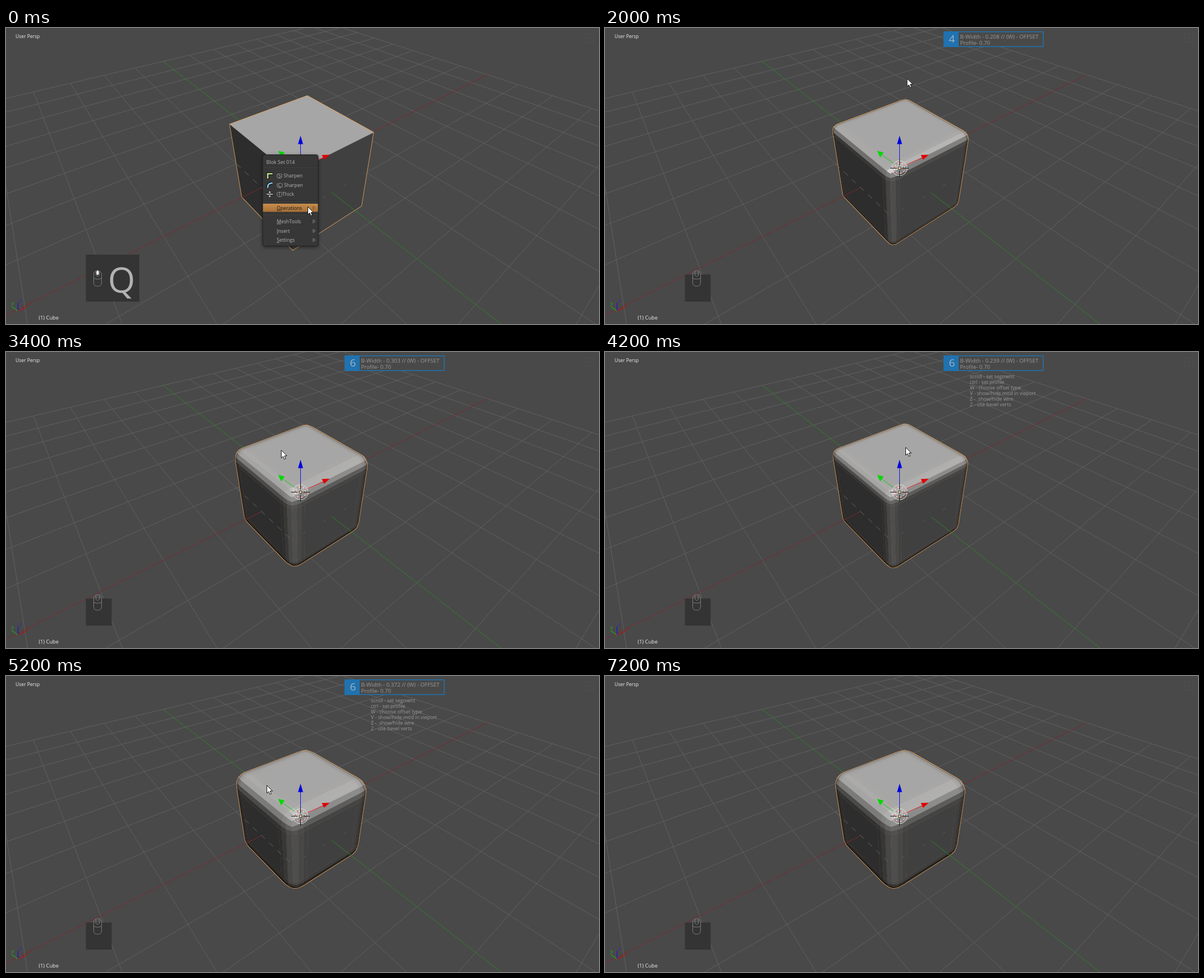
Write an HTML page with a canvas that moves like this. It is 1058 by 529 pixels and loops after 7800 ms.

```html
<!DOCTYPE html>
<html lang="en">
<head>
<meta charset="utf-8">
<title>Bevel a cube</title>
<style>
html, body { margin: 0; width: 100%; height: 100%; overflow: hidden; background: #494949; }
canvas { display: block; }
</style>
</head>
<body>
<canvas id="view" width="1058" height="529"></canvas>
<script>
const ctx = document.getElementById('view').getContext('2d');
const FONT = '"Open Sans", "Noto Sans", sans-serif';
const LOOP = 7800, STEP = 200;

// time, x, y of the pointer tip
const POINTER = [
  [0, 538, 319], [200, 548, 320], [400, 566, 318], [1000, 614, 60], [1200, 612, 28],
  [1400, 604, 30], [2600, 473, 150], [3000, 382, 165], [3600, 545, 180], [4200, 536, 170],
  [4800, 548, 178], [5200, 465, 195], [6000, 444, 206], [6200, 443, 207], [7000, 154, 488]
];
// time, bevel width
const WIDTH = [
  [1400, 0.01], [2600, 0.406], [3000, 0.5], [3600, 0.205], [4200, 0.239],
  [4800, 0.222], [5200, 0.372], [6000, 0.375]
];

function at(track, t) {
  const i = track.findIndex(k => k[0] > t);
  if (i < 0) return track[track.length - 1].slice(1);
  if (i === 0) return track[0].slice(1);
  const a = track[i - 1], b = track[i], f = (t - a[0]) / (b[0] - a[0]);
  return a.slice(1).map((v, j) => v + (b[j + 1] - v) * f);
}

// ---------- drawing helpers ----------
function path(points, close) {
  ctx.beginPath();
  points.forEach(p => ctx.lineTo(p[0], p[1]));
  if (close) ctx.closePath();
}
function line(color, width, ...points) {
  path(points);
  ctx.strokeStyle = color;
  ctx.lineWidth = width;
  ctx.stroke();
}
function poly(color, ...points) {
  path(points, true);
  ctx.fillStyle = color;
  ctx.fill();
}
function box(color, x, y, w, h) {
  ctx.fillStyle = color;
  ctx.fillRect(x, y, w, h);
}
function ring(color, x, y, r, dash = []) {
  ctx.beginPath();
  ctx.arc(x, y, r, 0, 7);
  ctx.setLineDash(dash);
  ctx.strokeStyle = color;
  ctx.lineWidth = 1;
  ctx.stroke();
  ctx.setLineDash([]);
}
function text(str, x, y, color, size = 8.7) {
  ctx.font = size + 'px ' + FONT;
  ctx.fillStyle = color;
  ctx.fillText(str, x, y);
}

// ---------- camera ----------
const TURN = 0.678, TILT = 0.698, FOCAL = 578.6, DIST = 7;
const sinA = Math.sin(TURN), cosA = Math.cos(TURN), sinB = Math.sin(TILT), cosB = Math.cos(TILT);
const CAMERA = [-3.4, -4.29, 4.37];

function depth(x, y, z) {
  return DIST + (x * sinA + y * cosA) * cosB - z * sinB;
}
function project([x, y, z]) {
  const d = depth(x, y, z);
  const right = x * cosA - y * sinA - 0.0484;
  const down = -((x * sinA + y * cosA) * sinB + z * cosB) - 0.1754;
  return [529.5 + FOCAL * right / d, 265 + FOCAL * down / d];
}

// a line on the floor, cut in front of the camera
function floorLine(a, b, color) {
  const near = 0.3, da = depth(...a, 0), db = depth(...b, 0);
  if (da < near && db < near) return;
  const cut = (p, q, dp, dq) => {
    if (dp >= near) return p;
    const f = (near - dp) / (dq - dp);
    return [p[0] + (q[0] - p[0]) * f, p[1] + (q[1] - p[1]) * f];
  };
  line(color, 1, project([...cut(a, b, da, db), 0]), project([...cut(b, a, db, da), 0]));
}

// front = the part of the floor that the cube cannot hide
function floor(front) {
  for (const axis of [false, true]) {
    for (let c = -8; c <= 8; c++) {
      if (axis !== (c === 0) || (front ? c === -1 : false)) continue;
      if (!front && c < -1) continue;
      const from = front ? -8 : c === -1 ? -8 : -1;
      const to = front && c > -1 ? -1 : 8;
      floorLine([c, from], [c, to], axis ? '#2a852a' : '#606060');
      floorLine([from, c], [to, c], axis ? '#7e2929' : '#606060');
    }
  }
}

// ---------- cube ----------
const PROFILE = 3;

function cubeQuads(r, segments) {
  const h = 1 - r, half = Math.ceil(segments / 2), stops = [], quads = [];
  const angle = k => Math.min(k * Math.PI / 2 / segments, Math.PI / 4);
  for (let k = half; k >= 0; k--) stops.push([-1, k ? -Math.tan(angle(k)) : 0]);
  for (let k = 0; k <= half; k++) stops.push([1, k ? Math.tan(angle(k)) : 0]);
  for (let axis = 0; axis < 3; axis++) for (const side of [-1, 1]) {
    const point = (a, b) => {
      const n = (Math.abs(a[1]) ** PROFILE + Math.abs(b[1]) ** PROFILE + 1) ** (1 / PROFILE);
      const p = [];
      p[axis] = side * (h + r / n);
      p[(axis + 1) % 3] = a[0] * h + r * a[1] / n;
      p[(axis + 2) % 3] = b[0] * h + r * b[1] / n;
      return p;
    };
    for (let i = 1; i < stops.length; i++) for (let j = 1; j < stops.length; j++) {
      quads.push([
        point(stops[i - 1], stops[j - 1]), point(stops[i], stops[j - 1]),
        point(stops[i], stops[j]), point(stops[i - 1], stops[j])
      ]);
    }
  }
  return quads;
}

const sub = (a, b) => a.map((v, i) => v - b[i]);
const dot = (a, b) => a[0] * b[0] + a[1] * b[1] + a[2] * b[2];

function normal(q) {
  const a = sub(q[2], q[0]), b = sub(q[3], q[1]);
  const n = [a[1] * b[2] - a[2] * b[1], a[2] * b[0] - a[0] * b[2], a[0] * b[1] - a[1] * b[0]];
  const len = Math.hypot(...n) * (dot(n, q[0]) < 0 ? -1 : 1);
  return n.map(v => v / len);
}
function shade(n) {
  const light = dot(n, [-0.175, -0.25, 0.65]);
  const shine = 0.3 * Math.max(0, light / 0.718) ** 90;
  const v = Math.round(255 * Math.min(1, Math.max(0.06, light + shine)));
  return `rgb(${v},${v},${v})`;
}

function cube(r, segments) {
  const faces = cubeQuads(r, segments)
    .map(q => ({ q, n: normal(q) }))
    .filter(f => dot(f.n, sub(CAMERA, f.q[0])) > 0)
    .map(f => ({ points: f.q.map(project), color: shade(f.n) }));
  ctx.lineJoin = 'round';
  const pass = (width, color) => faces.forEach(f => {
    path(f.points, true);
    ctx.lineWidth = width;
    ctx.strokeStyle = color || f.color;
    ctx.stroke();
    if (!color) {
      ctx.fillStyle = f.color;
      ctx.fill();
    }
  });
  pass(2, '#eba75f');
  pass(0.4);
  ctx.lineJoin = 'miter';
}

// ---------- scene ----------
function gizmo() {
  ctx.save();
  ctx.translate(525.5, 250.5);
  line('#1010e0', 1, [0, -13], [0, -44]);
  poly('#0000e0', [-4.5, -43], [4.5, -43], [0, -58]);
  line('#10c810', 1, [-10, -8], [-31, -23]);
  poly('#00d800', [-40, -31], [-28.5, -28], [-34.5, -19]);
  line('#e01010', 1, [12, -6], [41, -19]);
  poly('#e00000', [52, -24], [38, -23.5], [42, -15]);
  ring('#dcdcdc', 0, 0, 13.5);
  ring('#ffffff', 0, 0, 9.5);
  ring('#d83030', 0, 0, 9.5, [3.7, 3.7]);
  for (const [x, y] of [[1, 0], [-1, 0], [0, 1], [0, -1]]) {
    line('#111', 1, [x * 5, y * 5], [x * 16.5, y * 16.5]);
  }
  ctx.beginPath();
  ctx.arc(0, 0, 2.2, 0, 7);
  ctx.fillStyle = '#ffd38a';
  ctx.fill();
  ring('#222', 0, 0, 2.5);
  ctx.restore();
}

function corners() {
  text('User Persp', 17, 17.5, '#eee', 8.5);
  text('(1) Cube', 58.3, 521, '#eee', 9.3);
  line('#1a1ad0', 1.4, [21.5, 506], [21.5, 491]);
  line('#1ca41c', 1.4, [21.5, 506], [10.5, 498]);
  line('#a41c1c', 1.4, [21.5, 506], [37, 498.5]);
  text('z', 23.5, 489.5, '#2828d8', 9);
  text('y', 9.5, 495, '#1cac1c', 9);
  text('x', 37.5, 497, '#a02020', 9);
  ctx.strokeStyle = '#4f4f4f';
  ctx.lineWidth = 1;
  ctx.strokeRect(1033.5, 10.5, 15, 15);
  line('#4f4f4f', 1, [1037, 22], [1046, 13]);
}

function keys(pressed, wheel) {
  box('#343434', 142.5, pressed ? 405 : 440.5, pressed ? 95.5 : 46, pressed ? 84 : 48.5);
  ctx.strokeStyle = '#7c7c7c';
  ctx.lineWidth = 1;
  ctx.beginPath();
  ctx.roundRect(156.5, 433.5, 14, 28, [7, 7, 6, 6]);
  ctx.moveTo(156.5, 447);
  ctx.quadraticCurveTo(163.5, 451, 170.5, 447);
  ctx.moveTo(160.5, 434.5);
  ctx.lineTo(160.5, 442);
  ctx.quadraticCurveTo(163.5, 446, 166.5, 442);
  ctx.lineTo(166.5, 434.5);
  ctx.stroke();
  if (wheel) {
    ctx.beginPath();
    ctx.ellipse(163.5, 437.5, 2.2, 4, 0, 0, 7);
    ctx.fillStyle = '#eee';
    ctx.fill();
  }
  if (pressed) text('Q', 182, 473, '#b2b2b2', 62);
}

// ---------- menus ----------
const ICONS = {
  corner() {
    line('#111', 5, [2, 11], [2, 2], [11, 2]);
    line('#c4e08c', 2.6, [2, 10.5], [2, 2], [10.5, 2]);
  },
  curve(color = '#86c8f0') {
    for (const [c, w] of [['#111', 5], [color, 2.6]]) {
      ctx.beginPath();
      ctx.moveTo(2, 10.5);
      ctx.quadraticCurveTo(1.5, 2, 10.5, 2);
      ctx.strokeStyle = c;
      ctx.lineWidth = w;
      ctx.stroke();
    }
  },
  bevel() {
    ICONS.curve('#b8dc90');
    box('#eee', 0, 1, 3, 3);
  },
  thick() {
    line('#111', 4, [0, 5.5], [11, 5.5]);
    line('#eee', 1.5, [0, 5.5], [11, 5.5]);
    poly('#eee', [3.5, 3], [7.5, 3], [5.5, 0]);
    poly('#eee', [3.5, 8], [7.5, 8], [5.5, 11]);
  },
  step() {
    poly('#b4dc94', [1, 10], [1, 7.5], [4, 7.5], [4, 4.5], [7, 4.5], [7, 1.5], [10, 1.5], [10, 10]);
  },
  slash() { ICONS.pair('#777', '#555'); },
  pair(a = '#eee', b = '#bbb') {
    box(b, 4, 1, 7, 7);
    box('#222', 0, 3, 8, 8);
    box(a, 1, 4, 6, 6);
  },
  array() {
    for (const p of [0.5, 4, 7.5]) {
      box('#111', p - 0.5, p - 0.5, 4, 4);
      box('#8cc8ec', p, p, 2.8, 2.8);
    }
  },
  clear() {
    line('#c43a3a', 1.3, [10, 1], [1, 1], [1, 10]);
    line('#e04848', 1.5, [5, 5], [10, 10]);
    line('#e04848', 1.5, [10, 5], [5, 10]);
  },
  multi() {
    ICONS.curve();
    line('#86c8f0', 1.6, [6, 11], [6.5, 8], [8, 6.5], [11, 6]);
  },
  dial() { ring('#111', 5.5, 5.5, 5, [2, 1.6]); }
};

// label, middle y, icon, underlined letter, has submenu
const MAIN = {
  x: 458, y: 226.5, w: 99, h: 163, lines: [248.5, 309, 333],
  items: [
    ['(S) Sharpen', 264, 'corner', 1], ['(C) Sharpen', 280.5, 'curve', 1], ['(T)Thick', 297, 'thick', 1],
    ['Operations', 321.5, '', 0, 1], ['MeshTools', 345.5, '', 0, 1],
    ['Insert', 362.5, '', 0, 1], ['Settings', 379, '', 0, 1]
  ]
};
const SUB = {
  x: 558, y: 7.5, w: 116, h: 323, lines: [58, 99, 123, 147, 188, 212, 253, 277, 302, 326],
  items: [
    ['(B)Width', 29.5, 'bevel', 1], ['(2d)Bevel', 46, 'bevel', 1], ['(S) Sharpen', 70, 'corner', 1],
    ['(C) Sharpen', 87, 'curve', 1], ['Step', 111, 'step', 3], ['(C) Slash', 135, 'slash', 1],
    ['(Q)Array', 159.5, 'array', 1], ['(T)Thick', 176, 'thick', 1], ['Merge', 200.5, 'pair', 0, 1],
    ['Clear S/C/Sharps', 224.5, 'clear', 5], ['Clean Mesh (E)', 241, 'clear', 12],
    ['Material Link', 265.5, '', -1], ['Bevel Multiplier', 289.5, 'multi', -1],
    ['Sharps Manager', 314, 'dial', -1]
  ]
};

function menu(m, active) {
  ctx.save();
  ctx.shadowColor = 'rgba(0,0,0,.55)';
  ctx.shadowBlur = 6;
  ctx.shadowOffsetY = 2;
  ctx.beginPath();
  ctx.roundRect(m.x, m.y, m.w, m.h, 4);
  ctx.fillStyle = '#373737';
  ctx.fill();
  ctx.restore();
  ctx.strokeStyle = '#222';
  ctx.lineWidth = 1;
  ctx.stroke();
  for (const y of m.lines) {
    line('#2c2c2c', 1, [m.x + 1, y - 0.5], [m.x + m.w - 1, y - 0.5]);
    line('#434343', 1, [m.x + 1, y + 0.5], [m.x + m.w - 1, y + 0.5]);
  }
  for (const item of m.items) {
    const [label, y, icon, mark, more] = item;
    const on = item === active;
    if (on) {
      const fill = ctx.createLinearGradient(0, y - 7, 0, y + 7);
      fill.addColorStop(0, '#c58c4c');
      fill.addColorStop(1, '#a87036');
      box(fill, m.x + 0.5, y - 7.5, m.w - 1, 14.5);
    }
    const color = on ? '#151515' : icon === 'slash' ? '#606060' : '#b4b4b4';
    const x = m.x + (m === MAIN ? 25 : 24.5);
    text(label, x, y + 3, color);
    if (mark >= 0) {
      const left = x + ctx.measureText(label.slice(0, mark)).width;
      box(color, left, y + 4.2, ctx.measureText(label[mark]).width, 0.8);
    }
    if (icon) {
      ctx.save();
      ctx.translate(m.x + 7, y - 5.5);
      ICONS[icon]();
      ctx.restore();
    }
    if (more) {
      const e = m.x + m.w - 9;
      path([[e, y - 3], [e + 4, y], [e, y + 3]], true);
      ctx.strokeStyle = on ? '#7a5228' : '#888';
      ctx.lineWidth = 1;
      ctx.stroke();
    }
  }
}

function menus(t, y) {
  menu(MAIN, MAIN.items[3]);
  text('Blok Set 014', 464.5, 243, '#b4b4b4', 8.9);
  if (t < 400) return;
  const gap = item => Math.abs(item[1] - y - 5);
  const near = SUB.items.reduce((a, b) => gap(b) < gap(a) ? b : a);
  menu(SUB, near);
  poly('#8c8c8c', [611, 19], [620.5, 19], [615.7, 11]);
}

// ---------- overlay ----------
const HELP = ['scroll - set segment', 'ctrl - set profile', 'W - choose offset type',
  'V - show/hide mod in vieport', 'Z -  show/hide wire', '2 - use bevel verts'];

function panel(width, segments, help) {
  box('#494949', 604, 6, 178, 28);
  box('#2072b0', 604, 6, 27, 28);
  ctx.strokeStyle = '#2072b0';
  ctx.lineWidth = 1.5;
  ctx.strokeRect(604.75, 6.75, 177, 26.5);
  text(segments, 613.5, 26, '#a3b3c0', 19);
  text(`B-Width - ${width.toFixed(3)} // (W) - OFFSET`, 633.5, 19, '#9a9a9a', 9.85);
  text('Profile- 0.70', 633.5, 30, '#9a9a9a', 9.6);
  if (help) HELP.forEach((s, i) => text(s, 651, 46.5 + i * 10, '#989898', 8.8));
}

function pointer(x, y) {
  path([[0, 0], [0, 14], [3.2, 11], [5.4, 16], [7.8, 15], [5.6, 10.2], [10, 10]]
    .map(p => [x + 0.5 + p[0], y + 0.5 + p[1]]), true);
  ctx.fillStyle = '#fff';
  ctx.fill();
  ctx.strokeStyle = '#111';
  ctx.lineWidth = 1;
  ctx.stroke();
}

function draw(t) {
  const bevel = t >= 1400;
  const [width] = at(WIDTH, t), [x, y] = at(POINTER, t);
  const segments = t < 3200 ? 4 : t < 3400 ? 5 : 6;

  box('#494949', 0, 0, 1058, 529);
  floor(false);
  cube(bevel ? width : 0, bevel ? segments : 0);
  floor(true);
  // floor lines that lie in the cube's sides flicker through them
  ctx.setLineDash([10, 10]);
  floorLine([-1, 1], [-1, -1], '#666');
  ctx.setLineDash([6, 36]);
  floorLine([1, -1], [-1, -1], '#585858');
  ctx.setLineDash([]);

  gizmo();
  corners();
  keys(t < 400, !bevel);
  if (!bevel) menus(t, y);
  else if (t < 6400) panel(width, segments, t >= 4000);
  if (t < 7200) pointer(x, y);
}

const start = performance.now();
function tick() {
  const t = (performance.now() - start) % LOOP;
  draw(Math.floor(t / STEP) * STEP);
  requestAnimationFrame(tick);
}
tick();
</script>
</body>
</html>
```
